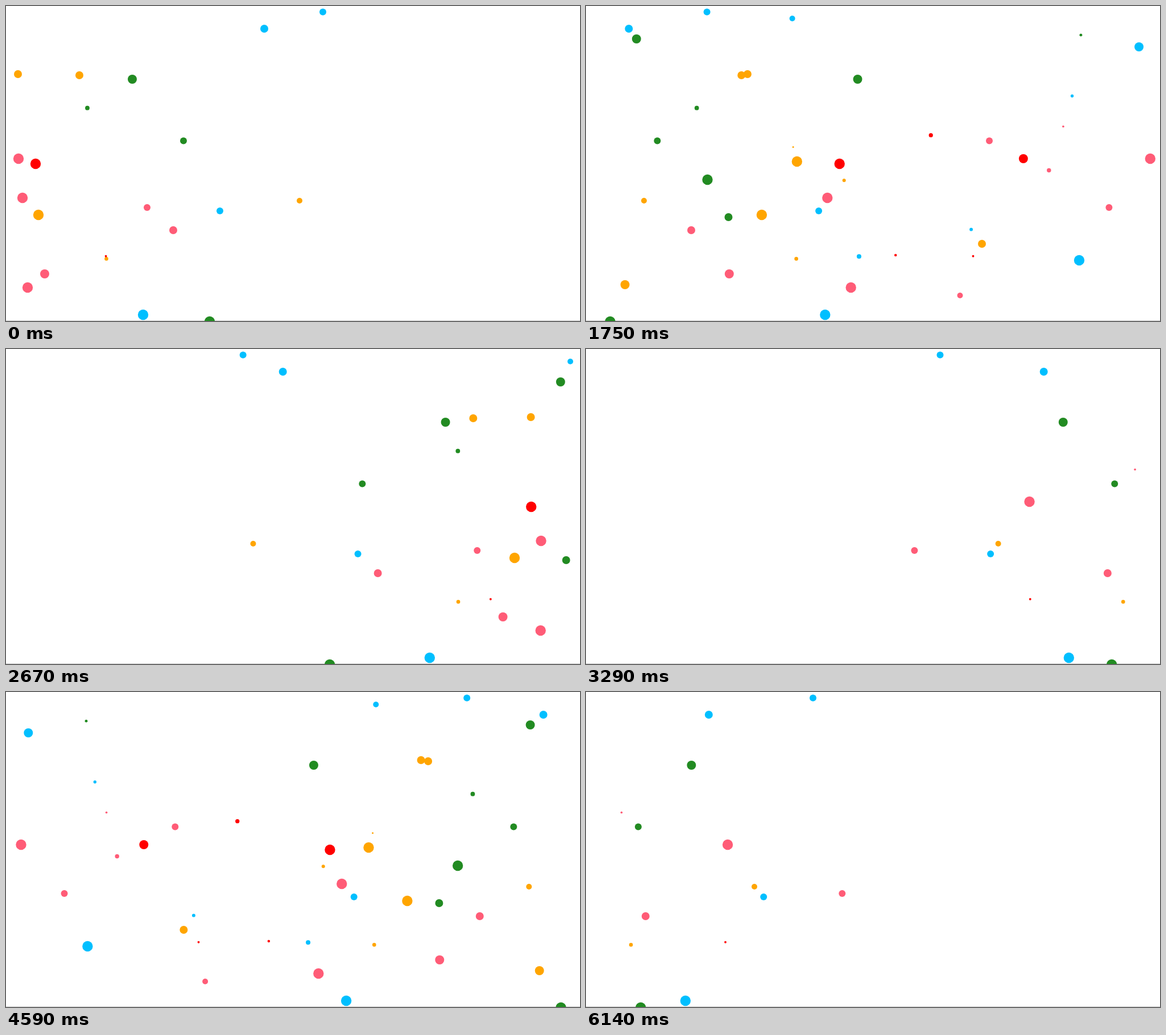
An HTML page with a canvas that plays this animation: 1009x555 px, repeating every 6.22 s.

```html
<!DOCTYPE html>
<html lang="en">
<head>
<meta charset="utf-8">
<title>Swinging dots</title>
<style>
  html, body { margin: 0; width: 100%; height: 100%; overflow: hidden; background: #fff; }
  canvas { display: block; }
</style>
</head>
<body>
<canvas id="stage" width="1009" height="555"></canvas>
<script>
const ctx = document.getElementById('stage').getContext('2d');
const W = 1009, H = 555, MID = 512;
const LOOP = 6220, STEP = 77, LEAD = 30, LAST = 80;
const pink = '#ff5c77', orange = '#ffa500', green = '#228b22', blue = '#00bfff', red = '#ff0000';
const dots = [];

// A dot swings around the middle: offset a at the start, b a quarter turn later.
const dot = (r, color, y, a, b) => dots.push({ r, color, y, a, b });
const group = (r, list) => list.forEach(d => dot(r, ...d));

group(9.2, [
  [pink, 269, -490, 323], [pink, 338, -483, -284], [pink, 496, -474, -236],
  [orange, 368, -455, -397], [orange, 274, -805, -468], [red, 278, -460, -252],
  [green, 306, -782, -628], [green, 556, -154, -565],
  [blue, 544, -271, -205], [blue, 448, -879, 36]
]);
group(8, [
  [green, 129, -290, -151], [green, 58, -586, -685], [blue, 72, -861, 156],
  [blue, 27, -1129, 172], [pink, 472, -444, -454], [orange, 491, -803, -792],
  [red, 269, -799, -38]
]);
group(7, [
  [orange, 120, -491, -438], [orange, 122, -383, -407], [orange, 419, -923, -165],
  [pink, 395, -218, -437], [green, 372, -565, -503], [blue, 40, -58, -492]
]);
group(6, [
  [blue, 10.5, 45, -304], [blue, 361, -136, -164], [green, 237.5, -200, -494],
  [pink, 355, -264, 334], [pink, 237.5, -1040, -197]
]);
group(5, [
  [orange, 343, 4, -439], [blue, 22, -551, -377], [pink, 510, -950, -217]
]);

// Tiny dots are scattered over the same range.
let seed = 11;
function random(min, max) {
  seed = (seed * 16807) % 2147483647;
  return min + (max - min) * seed / 2147483647;
}
const tints = [orange, red, blue, pink, green];
for (let i = 0; i < 13; i++) {
  dot(random(1.5, 4), tints[i % tints.length], random(5, 550), random(-1000, -300), random(-500, 250));
}

// The picture advances in even ticks.
function tick(t) {
  const n = Math.min(LAST, Math.floor((t + LEAD) / STEP));
  return Math.max(0, n * STEP - LEAD);
}

// Steady turn with a slight slow drift, in radians.
function phase(t) {
  const s = t / 1000;
  return (63.7 * s + 0.6 * Math.sin(0.668 * s)) * Math.PI / 180;
}

function draw(t) {
  const p = phase(tick(t)), c = Math.cos(p), s = Math.sin(p);
  ctx.fillStyle = '#fff';
  ctx.fillRect(0, 0, W, H);
  ctx.fillStyle = '#c8c8c8';
  ctx.fillRect(0, H - 1, W, 1);
  for (const d of dots) {
    ctx.fillStyle = d.color;
    ctx.beginPath();
    ctx.arc(MID + d.a * c + d.b * s, d.y, d.r, 0, Math.PI * 2);
    ctx.fill();
  }
}

const start = performance.now();
function loop() {
  draw((performance.now() - start) % LOOP);
  requestAnimationFrame(loop);
}
loop();
</script>
</body>
</html>
```
